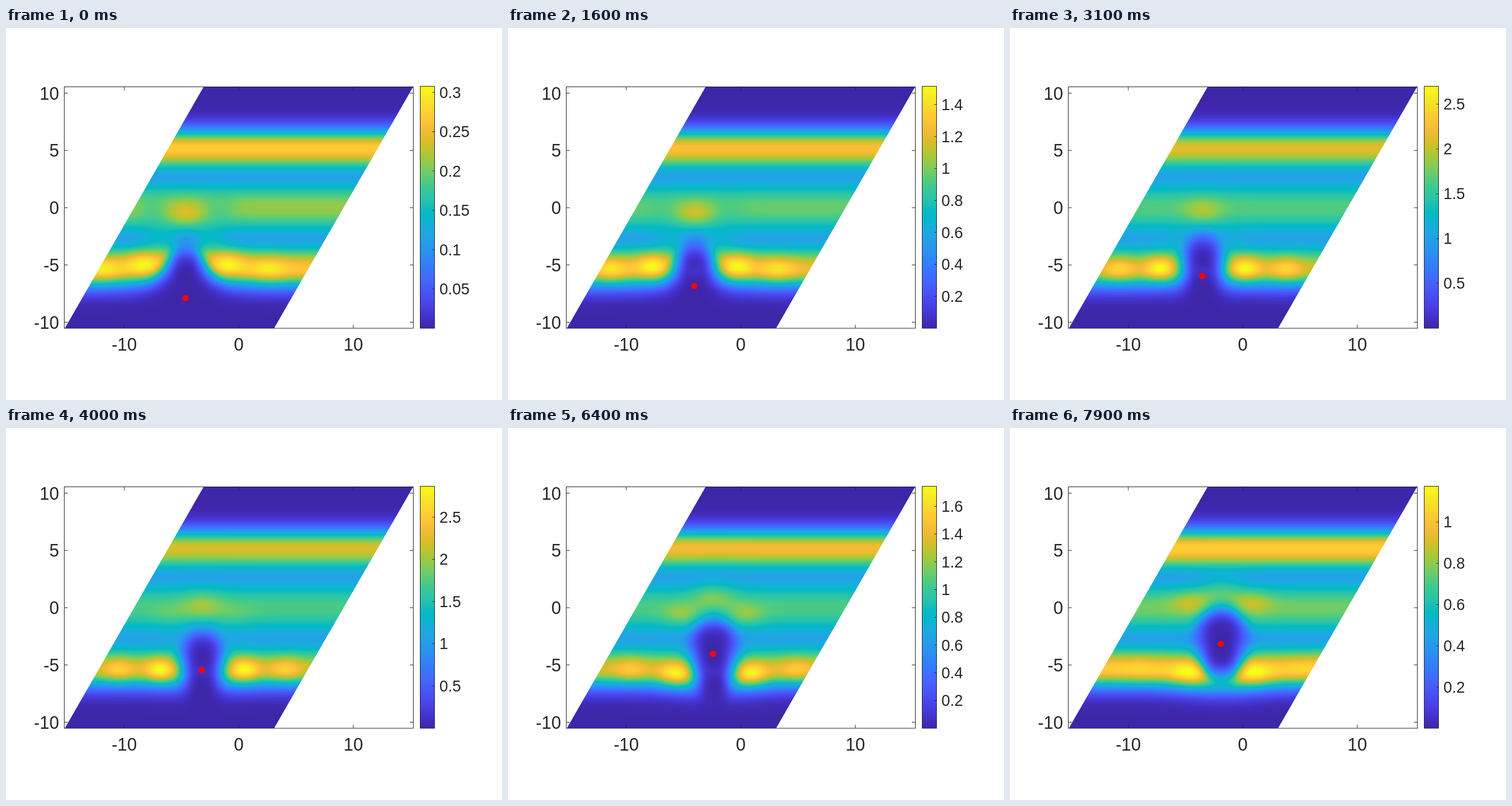
An HTML page with a canvas for the animation above (8 s loop, 864 px wide and 648 px high).

```html
<!DOCTYPE html>
<html lang="en">
<head>
<meta charset="utf-8">
<title>Density map with moving probe</title>
<style>
html, body { margin: 0; width: 100%; height: 100%; overflow: hidden; background: #fff; }
#stage { position: relative; width: 864px; height: 648px; overflow: hidden; }
canvas { position: absolute; left: 102px; top: 102px; clip-path: polygon(242.5px 0, 607.5px 0, 365px 421px, 0.5px 421px); }
svg { position: absolute; left: 0; top: 0; }
text { font-family: "Liberation Sans", Arial, sans-serif; fill: #262626; }
.axis { font-size: 30.5px; }
.scale { font-size: 27px; }
path, rect { fill: none; stroke: #262626; stroke-width: 1; }
</style>
</head>
<body>
<div id="stage">
  <canvas id="map" width="608" height="421"></canvas>
  <svg width="864" height="648" viewBox="0 0 864 648">
    <defs><linearGradient id="ramp" x1="0" y1="1" x2="0" y2="0"></linearGradient></defs>
    <rect x="101.5" y="102.5" width="608" height="420.5"/>
    <path id="ticks"/>
    <g id="labels"></g>
    <rect x="721.5" y="101.5" width="25" height="421.5" style="fill:url(#ramp)"/>
    <path id="barTicks"/>
    <g id="barLabels"></g>
    <circle id="dot" r="5.6" fill="#f00"/>
  </svg>
</div>
<script>
const LOOP = 8000, STEP = 300, LEFT = 102, TOP = 102, W = 608, H = 421;
const $ = id => document.getElementById(id);
const { exp, abs, max, min, cos, PI } = Math;

const RAMP = ('3e26a8 4332cb 4741e5 4852f4 4563fd 3875fe 2e87f7 2797eb 20a5e3 12b1d6 02bac3 ' +
  '24c1ae 37c897 57cc7a 81cc59 abc739 d1bf27 f0ba36 fec338 fad62d f5e924 f9fb15').split(' ');
const rgb = RAMP.map(h => [0, 2, 4].map(i => parseInt(h.slice(i, i + 2), 16)));
const lut = Array.from({ length: 256 }, (_, i) => {
  const p = i / 255 * (rgb.length - 1), k = min(p | 0, rgb.length - 2);
  return rgb[k].map((c, j) => Math.round(c + (rgb[k + 1][j] - c) * (p - k)));
});

// Key values at these steps, joined by smooth cubics
const AT = [0, 4, 8, 11, 18, 22, 27];
const KEYS = {
  peak:   [.3077, .999, 2.049, 2.7, 2.515, 1.745, 1.174],
  upper:  [.88, .86, .82, .79, .78, .82, .89],
  mid:    [.69, .66, .62, .61, .59, .6, .65],
  lower:  [.86, .84, .77, .74, .74, .76, .88],
  roof:   [383, 380, 374, 366, 350, 338, 318],
  blob:   [.12, .14, .13, .12, .1, .07, 0],
  blobY:  [328, 328, 323, 320, 302, 297, 288],
  flank:  [-.08, -.05, -.03, 0, .09, .11, .11],
  flankY: [315, 315, 317, 320, 328, 326, 303],
  bead:   [.14, .16, .23, .26, .26, .24, .14],
  beadY:  [408, 411, 416, 418, 426, 430, 427],
  outer:  [.11, .12, .16, .17, .15, .12, .03]
};

function slope(v, i) {
  const d = k => (v[k + 1] - v[k]) / (AT[k + 1] - AT[k]);
  if (i === 0) return d(0);
  if (i === AT.length - 1) return d(i - 1);
  const a = AT[i] - AT[i - 1], b = AT[i + 1] - AT[i];
  return (d(i - 1) * b + d(i) * a) / (a + b);
}

function keyed(v, n) {
  let i = 0;
  while (i < AT.length - 2 && n >= AT[i + 1]) i++;
  const h = AT[i + 1] - AT[i], u = (n - AT[i]) / h, w = 1 - u;
  return v[i] * (1 + 2 * u) * w * w + v[i + 1] * u * u * (3 - 2 * u) +
    h * u * w * (slope(v, i) * w - slope(v, i + 1) * u);
}

const bell = (d, s) => exp(-(d / s) * (d / s));
const sigmoid = z => 1 / (1 + exp(-z));
const VALLEY = .37;

// Undisturbed layers: middle band, valley, outer band, decay
function layers(y, p) {
  const d = abs(y - 313), crest = y < 313 ? p.upper : p.lower, at = y < 313 ? 104 : 107;
  if (d < 53) return VALLEY + (p.mid - VALLEY) * (.5 + .5 * cos(PI * d / 53)) ** .8;
  if (d < at) return VALLEY + (crest - VALLEY) * (.5 - .5 * cos(PI * (d - 53) / (at - 53)));
  return crest * bell(d - at, 32.5);
}

function drawMap(n, p, cx) {
  const ctx = $('map').getContext('2d'), img = ctx.createImageData(W, H), px = img.data;
  const lift = .1 * max(0, 1 - n / 18);
  const midBend = max(0, n - 10) * 1.1, lowBend = max(-7, 10 - .85 * n);
  const flare = max(-.15, .4 - .035 * n), floor = 437 + 10.6 * (27 - n);
  const beadX = 75 - 16 * (n / 27) ** 3;
  const cols = Array.from({ length: W }, (_, i) => {
    const s = i + LEFT + .5 - cx, a = abs(s);
    return {
      a, arch: .012 * s * s, midBend: midBend * bell(s, 38), lowBend: lowBend * bell(s, 80),
      blob: p.blob * bell(s, 34), flank: p.flank * bell(a - 56, 32), lift: lift * bell(a - 45, 30),
      bead: p.bead * bell(a - beadX, 27), outer: p.outer * bell(a - 145, 29),
      neck: .04 * min(1, n / 4) * bell(s, 18), haze: .06 * max(0, n - 20) / 7 * bell(s, 40)
    };
  });
  for (let j = 0; j < H; j++) {
    const y = j + TOP + .5;
    const nearMid = bell(y - 310, 45), nearLow = sigmoid((y - 385) / 8);
    const blobRow = bell(y - p.blobY, 24), flankRow = bell(y - p.flankY, 20), liftRow = bell(y - 368, 18);
    const beadRow = bell(y - p.beadY, 22), outerRow = bell(y - 421, 22);
    const neckRow = bell(y - 424, 14), hazeRow = bell(y - 256, 20);
    const half = max(14, 39 + flare * (y - 410));
    const from = max(0, (242 * (1 - j / H) | 0) - 242 + (242 * (1 - j / H) | 0 ? 242 : 0) - 3);
    const to = min(W, 368 + 243 * (1 - j / H) | 0);
    for (let i = from; i < to; i++) {
      const c = cols[i];
      const y2 = y + c.midBend * nearMid + c.lowBend * nearLow;
      const hole = exp(-((c.a / half) ** 3)) * sigmoid((y - p.roof - c.arch) / 8.5) *
        sigmoid((floor - c.arch - y) / 9);
      let v = (layers(y2, p) + c.lift * liftRow) * (1 - hole);
      v += c.blob * blobRow + c.flank * flankRow + c.bead * beadRow + c.outer * outerRow +
        c.neck * neckRow + c.haze * hazeRow;
      const col = lut[max(0, min(255, Math.round(v * 255)))], o = 4 * (j * W + i);
      px[o] = col[0]; px[o + 1] = col[1]; px[o + 2] = col[2]; px[o + 3] = 255;
    }
  }
  ctx.putImageData(img, 0, 0);
}

const label = (x, y, s, cls, anchor) =>
  `<text class="${cls}" x="${x}" y="${y}" text-anchor="${anchor}">${s}</text>`;

function drawBar(peak) {
  // Finest round step that gives at most eight labels
  const step = [.02, .05, .1, .2, .5, 1].find(s => peak / s < 9);
  let marks = '', html = '';
  for (let k = 1; k * step <= peak; k++) {
    const y = 523 - 421.5 * k * step / peak;
    marks += `M746.5 ${y}h-4`;
    html += label(755, y + 9.5, +(k * step).toFixed(2), 'scale', 'start');
  }
  $('barTicks').setAttribute('d', marks);
  $('barLabels').innerHTML = html;
}

function setup() {
  $('ramp').innerHTML = RAMP.map((c, i) =>
    `<stop offset="${i / (RAMP.length - 1)}" stop-color="#${c}"/>`).join('');
  let d = '', html = '';
  for (const v of [-10, 0, 10]) {
    const x = 405.5 + 19.95 * v;
    d += `M${x} 523v-6M${x} 102.5v6`;
    html += label(x, 562, v, 'axis', 'middle');
  }
  for (const v of [-10, -5, 0, 5, 10]) {
    const y = 313 - 19.95 * v;
    d += `M101.5 ${y}h6M709.5 ${y}h-6`;
    html += label(92.5, y + 11, v, 'axis', 'end');
  }
  $('ticks').setAttribute('d', d);
  $('labels').innerHTML = html;
}

let shown = -1;
function render(t) {
  const n = Math.floor((t % LOOP + 200) / STEP);
  if (n === shown) return;
  shown = n;
  const p = {};
  for (const k in KEYS) p[k] = keyed(KEYS[k], n);
  const x = 312.5 + 2.03 * n;
  drawMap(n, p, x + 1);
  drawBar(p.peak);
  $('dot').setAttribute('cx', x);
  $('dot').setAttribute('cy', 470.5 - 3.5 * n);
}

setup();
const start = performance.now();
function tick() {
  render(performance.now() - start);
  requestAnimationFrame(tick);
}
render(0);
requestAnimationFrame(tick);
</script>
</body>
</html>
```
